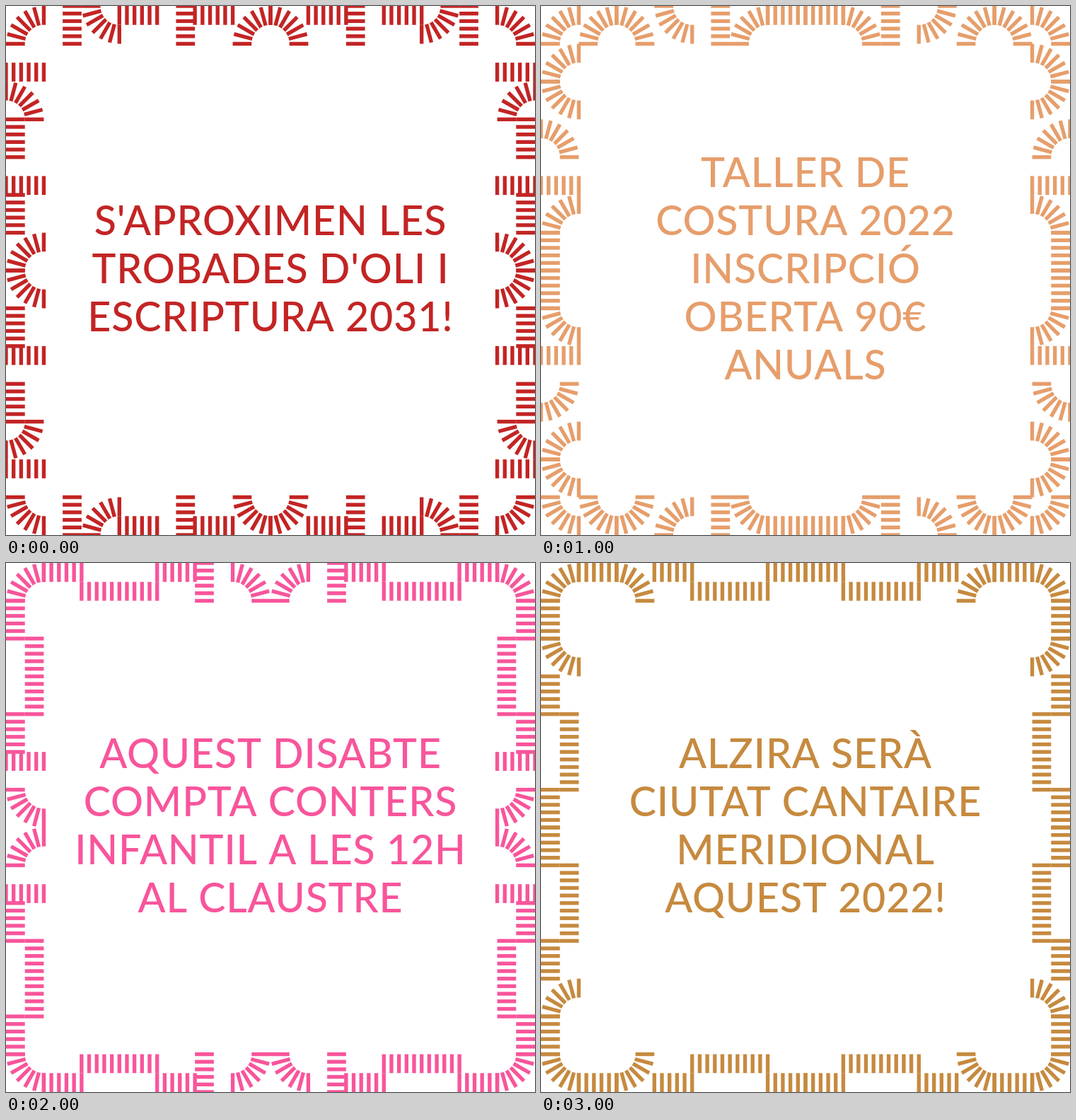
Animation of 748x748 px, one loop 3.5 s. Source, as an HTML page with a canvas:

```html
<!DOCTYPE html>
<html lang="ca">
<head>
<meta charset="utf-8">
<style>
  html, body { margin: 0; width: 100%; height: 100%; overflow: hidden; background: #fff; }
  canvas { display: block; }
</style>
</head>
<body>
<canvas id="stage" width="748" height="748"></canvas>
<script>
const SIZE = 748;
const UNIT = SIZE / 28;
const BAR = UNIT / 5;
const STEP = UNIT * 2 / 5;
const SLIDE_MS = 500;
const LINE = 68;
const QUADRANTS = ['BR', 'BL', 'TL', 'TR'];

const ctx = document.getElementById('stage').getContext('2d');

// Upright bars along x, one unit tall; positions are in grid units.
function ticks(x, y, length) {
  for (let i = 0; i <= length * 2.5; i++) {
    ctx.fillRect(x * UNIT + i * STEP - BAR / 2, y * UNIT, BAR, UNIT);
  }
}

// Level bars stacked over the two-unit depth of the border.
function stack(x, width) {
  for (let i = 0; i <= 5; i++) {
    ctx.fillRect(x * UNIT, i * STEP - BAR / 2, width * UNIT, BAR);
  }
}

// Quarter ring of radial bars.
function fan(x, y, quadrant) {
  const start = QUADRANTS.indexOf(quadrant) * Math.PI / 2;
  for (let i = 0; i <= 6; i++) {
    ctx.save();
    ctx.translate(x * UNIT, y * UNIT);
    ctx.rotate(start + i * Math.PI / 12);
    ctx.fillRect(UNIT, -BAR / 2, UNIT, BAR);
    ctx.restore();
  }
}

const outerCorner = () => fan(2, 2, 'TL');
const innerCorner = () => fan(0, 0, 'BR');

// Each edge describes the left half of the top border.
const slides = [
  {
    color: '#c32424',
    lines: ["S'APROXIMEN LES", "TROBADES D'OLI I", 'ESCRIPTURA 2031!'],
    corner: outerCorner,
    edge() {
      stack(3, 1); fan(6, 0, 'BL'); ticks(6, 0, 2);
      stack(9, 1); ticks(10, 0, 2); fan(14, 2, 'TL');
    }
  },
  {
    color: '#000',
    lines: ['EXPOSICIÓ: EL', 'BRODAT A LA', 'MUNTANYA', 'LLUMINOSA'],
    corner: outerCorner,
    edge() {
      fan(4, 0, 'BL'); ticks(4, 0, 2);
      stack(6, 1); stack(8, 1); stack(11, 1); stack(13, 1);
    }
  },
  {
    color: '#e69e6b',
    lines: ['TALLER DE', 'COSTURA 2022', 'INSCRIPCIÓ', 'OBERTA 90€', 'ANUALS'],
    corner: outerCorner,
    edge() {
      fan(4, 2, 'TL'); fan(4, 2, 'TR'); fan(8, 0, 'BL');
      stack(9, 1); fan(12, 2, 'TL'); ticks(12, 0, 2);
    }
  },
  {
    color: '#bbc58c',
    lines: ['TALLER DE', 'CERÁMICA', 'MATRICULA 2023', 'OBERTA '],
    corner: innerCorner,
    edge() {
      fan(2, 2, 'TR'); fan(4, 0, 'BR'); ticks(6, 1, 2);
      fan(8, 0, 'BR'); fan(12, 2, 'TL'); stack(13, 1);
    }
  },
  {
    color: '#f8559b',
    lines: ['AQUEST DISABTE', 'COMPTA CONTERS', 'INFANTIL A LES 12H', 'AL CLAUSTRE'],
    corner: outerCorner,
    edge() {
      ticks(2, 0, 2); ticks(4, 1, 4); ticks(8, 0, 2);
      stack(10, 1); fan(12, 2, 'TR');
    }
  },
  {
    color: '#ce63ce',
    lines: ['MOSTRA DE CINE', 'BOIRES+ TOT EL', 'DISABTE'],
    corner: innerCorner,
    edge() {
      fan(4, 2, 'TL'); fan(6, 2, 'TL'); stack(6, 1);
      ticks(8, 1, 2); stack(11, 2);
    }
  },
  {
    color: '#c68a3f',
    lines: ['ALZIRA SERÀ', 'CIUTAT CANTAIRE', 'MERIDIONAL', 'AQUEST 2022!'],
    corner: outerCorner,
    edge() {
      ticks(2, 0, 2); fan(4, 2, 'TR'); ticks(6, 0, 2);
      ticks(8, 1, 4); ticks(12, 0, 2);
    }
  }
];

function drawBorder({ corner, edge }) {
  for (const sx of [1, -1]) {
    for (const sy of [1, -1]) {
      ctx.save();
      ctx.translate(sx < 0 ? SIZE : 0, sy < 0 ? SIZE : 0);
      ctx.scale(sx, sy);
      corner();
      edge();
      ctx.transform(0, 1, 1, 0, 0, 0); // swap axes for the side border
      edge();
      ctx.restore();
    }
  }
}

function drawText(lines) {
  ctx.font = '500 57.4px Lato, sans-serif';
  ctx.letterSpacing = '0.8px';
  ctx.textAlign = 'center';
  const firstBaseline = 392 - (lines.length - 1) * LINE / 2;
  lines.forEach((line, i) => {
    const shift = line.endsWith(' ') ? ctx.measureText(' ').width / 2 : 0;
    ctx.fillText(line.trim(), SIZE / 2 - shift, firstBaseline + i * LINE);
  });
}

function draw(now) {
  const slide = slides[Math.floor(now / SLIDE_MS) % slides.length];
  ctx.fillStyle = '#fff';
  ctx.fillRect(0, 0, SIZE, SIZE);
  ctx.fillStyle = slide.color;
  drawBorder(slide);
  drawText(slide.lines);
}

let start;
function tick(now) {
  start ??= now;
  draw(now - start);
  requestAnimationFrame(tick);
}
draw(0);
requestAnimationFrame(tick);
</script>
</body>
</html>
```
